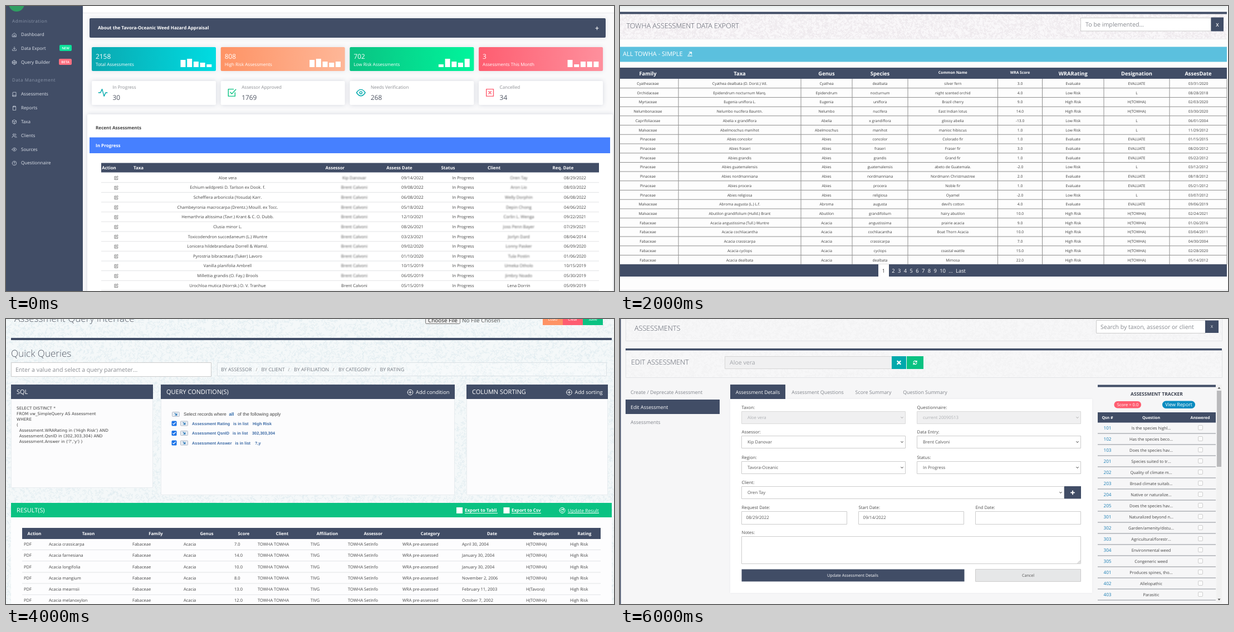
Recreate the animation shown at these times as an HTML page with a canvas. Size 1092 by 513 pixels, loop 8 s.

```html
<!DOCTYPE html>
<html lang="en">
<head>
<meta charset="utf-8">
<title>Assessment tour</title>
<style>
html, body { margin: 0; width: 100%; height: 100%; overflow: hidden; background: #fff; }
canvas { display: block; }
</style>
</head>
<body>
<canvas id="stage" width="1092" height="513"></canvas>
<script>
const g = document.getElementById('stage').getContext('2d');
const NAVY = '#414d66', GREEN = '#0ac282', RED = '#fe5d70', ORANGE = '#fe9365', TEAL = '#01a9ac', INK = '#444';
const SANS = '"Open Sans", sans-serif', ARIAL = '"Liberation Sans", Arial, sans-serif', WIDE = '"DejaVu Sans", Verdana, sans-serif';
const ORG = 'TOWHA', REGION = 'Tavora-Oceanic', LEAD = 'Brent Calvoni';

// y is the middle of the capitals
function text(s, x, y, size, color = INK, { w = 400, al = 'left', font = SANS, sp = 0 } = {}) {
  g.font = `${w} ${size}px ${font}`;
  g.textAlign = al;
  g.letterSpacing = sp + 'px';
  g.fillStyle = color;
  g.fillText(s, x, y + size * 0.36);
}
const mid = (s, x, y, size, color, w = 400) => text(s, x, y, size, color, { w, al: 'center' });
const title = (s, x, y, size) => text(s, x, y, size, '#555a66', { w: 300 });

function box(x, y, x2, y2, fill, stroke, r = 0) {
  g.beginPath();
  const o = stroke ? 0.5 : 0;
  g.roundRect(x + o, y + o, x2 - x - 2 * o, y2 - y - 2 * o, r);
  if (fill) { g.fillStyle = fill; g.fill(); }
  if (stroke) { g.strokeStyle = stroke; g.lineWidth = 1; g.stroke(); }
}
const rule = (x, x2, y, color) => box(x, y - 0.5, x2, y + 0.5, color);

function glow(x, y, x2, y2, fill, r, blur = 9, alpha = 0.13) {
  g.save();
  g.shadowColor = `rgba(60,75,110,${alpha})`;
  g.shadowBlur = blur;
  box(x, y, x2, y2, fill, null, r);
  g.restore();
}

// SVG path drawn on a 24-unit grid centred on x, y
function icon(d, x, y, size, color, width = 2) {
  g.save();
  g.translate(x - size / 2, y - size / 2);
  g.scale(size / 24, size / 24);
  g.strokeStyle = color;
  g.lineWidth = width;
  g.lineCap = g.lineJoin = 'round';
  g.stroke(new Path2D(d));
  g.restore();
}

const ICON = {
  home: 'M3 10L12 3l9 7v11H3zM9 21v-8h6v8',
  down: 'M3 15v6h18v-6M12 3v12M7 10l5 5 5-5',
  cube: 'M12 2l10 6v8l-10 6L2 16V8zM2 8l10 7 10-7M2 16l10-7 10 7M12 2v7M12 15v7',
  book: 'M4 20V4q0-2 2-2h14v20H6q-2 0-2-2zq0-3 2-3h14',
  clip: 'M8 4H5v18h14V4h-3M8 2h8v4H8z',
  pack: 'M12 2l9 5v10l-9 5-9-5V7zM3 7l9 5 9-5M12 12v10',
  users: 'M1 21q0-7 8-7t8 7M5 7a4 4 0 1 0 8 0a4 4 0 1 0-8 0M16 3q4 1 4 4t-4 4M19 15q4 1 4 6',
  eye: 'M1 12q5-8 11-8t11 8q-5 8-11 8T1 12zM9 12a3 3 0 1 0 6 0a3 3 0 1 0-6 0',
  help: 'M2 12a10 10 0 1 0 20 0a10 10 0 1 0-20 0M9 9q1-3 3-3t3 3q0 2-3 4M12 17v.1',
  pulse: 'M1 12h5l4-9 5 18 4-9h4',
  check: 'M8 11l4 4L22 4M20 12v9H3V3h13',
  cross: 'M3 3h18v18H3zM9 9l6 6M15 9l-6 6',
  edit: 'M11 4H3v17h17v-8M19 2l3 3-10 10H9v-3z',
  plus: 'M2 12a10 10 0 1 0 20 0a10 10 0 1 0-20 0M12 7v10M7 12h10',
  redo: 'M2 12a10 10 0 1 0 20 0a10 10 0 1 0-20 0M16 9a5 5 0 1 0 1 4M17 6v4h-4',
  cycle: 'M4 10a8 8 0 0 1 15-2M20 3v6h-6M20 14a8 8 0 0 1-15 2M4 21v-6h6',
  tick: 'M4 13l5 5L20 6',
  arrow: 'M6 6l12 12M18 8v10H8',
  chevron: 'M5 8l7 8 7-8',
  share: 'M2 21h20M5 15L19 4M9 3h11v10'
};

// Mottled paper made of short random curls
function paper(x, y, x2, y2, base, curl, n, seed) {
  const rnd = () => (seed = (seed * 16807) % 2147483647) / 2147483647;
  g.save();
  g.beginPath();
  g.rect(x, y, x2 - x, y2 - y);
  g.clip();
  g.fillStyle = base;
  g.fillRect(x, y, x2 - x, y2 - y);
  g.strokeStyle = curl;
  g.lineWidth = 1;
  g.beginPath();
  for (let i = 0; i < n; i++) {
    const a = x + rnd() * (x2 - x), b = y + rnd() * (y2 - y), t = rnd() * 6.3;
    g.moveTo(a + 2 * Math.cos(t), b + 2 * Math.sin(t));
    g.arc(a, b, 2, t, t + 2.5);
  }
  g.stroke();
  g.restore();
}

function blurred(s, x, y) {
  g.save();
  g.filter = 'blur(1.3px)';
  mid(s, x, y, 7.6, '#555');
  g.restore();
}

function sidebar() {
  box(0, 0, 138, 513, NAVY);
  g.fillStyle = '#2f9e62';
  g.beginPath();
  g.arc(19, -4, 14, 0, 7);
  g.fill();
  text('Administration', 11, 27, 8, '#8b96aa', { sp: 0.6 });
  text('Data Management', 11, 133.5, 8, '#8b96aa', { sp: 0.6 });
  const item = ([name, pic], y) => {
    icon(ICON[pic], 15, y + 0.5, 9, '#d5dbe6', 2);
    text(name, 27, y, 8.1, '#dfe4ec');
  };
  [['Dashboard', 'home'], ['Data Export', 'down'], ['Query Builder', 'cube']].forEach((m, i) => item(m, 51.5 + i * 24.8));
  [['Assessments', 'book'], ['Reports', 'clip'], ['Taxa', 'pack'], ['Clients', 'users'], ['Sources', 'eye'], ['Questionnaire', 'help']]
    .forEach((m, i) => item(m, 158.5 + i * 24.8));
  box(96, 70, 118, 81, '#0be19a', null, 2);
  mid('NEW', 107, 75.5, 6, '#fff', 600);
  box(95, 95, 118, 106, '#ff6f80', null, 2);
  mid('BETA', 106.5, 100.5, 6, '#fff', 600);
}

function dashboard() {
  box(0, 0, 1092, 513, '#fafafb');
  box(138, 0, 1092, 12, '#fff');
  rule(138, 1092, 12.5, '#e6e7ea');
  sidebar();
  glow(150, 22, 1077, 57, NAVY, 2);
  text(`About the ${REGION} Weed Hazard Appraisal`, 165, 39.5, 8.1, '#fff', { w: 700 });
  icon('M12 3v18M3 12h18', 1061.5, 40, 7, '#fff', 3.5);

  [['2158', 'Total Assessments', '#0aa8b0', '#00dce2', [13, 15, 10, 8, 5]],
   ['808', 'High Risk Assessments', ORANGE, '#feb798', [13, 15, 10, 8, 10]],
   ['702', 'Low Risk Assessments', GREEN, '#00f59c', [5, 15, 10, 8, 15]],
   ['3', 'Assessments This Month', RED, '#fe909d', [13, 5, 10, 10, 10]]
  ].forEach(([n, label, c1, c2, bars], i) => {
    const x = 154 + i * 231.7, fill = g.createLinearGradient(x, 0, x + 223, 0);
    fill.addColorStop(0, c1);
    fill.addColorStop(1, c2);
    glow(x, 74, x + 223, 117, fill, 2);
    text(n, x + 7, 90.5, 11.9, '#fff');
    text(label, x + 7, 105, 8.05, '#fff');
    bars.forEach((h, k) => box(x + 159.5 + k * 11.7, 110 - h, x + 168.5 + k * 11.7, 110, '#fff'));
  });
  [['In Progress', '30', 'pulse', TEAL], ['Assessor Approved', '1769', 'check', GREEN],
   ['Needs Verification', '268', 'eye', TEAL], ['Cancelled', '34', 'cross', RED]
  ].forEach(([label, n, pic, c], i) => {
    const x = 154 + i * 231.7;
    glow(x, 135, x + 223, 178, '#fff', 2, 8, 0.2);
    icon(ICON[pic], x + 20, 156, 17, c, 2);
    text(label, x + 37.5, 146.5, 8.1, '#8b8d92');
    text(n, x + 37.5, 164.5, 11.9, '#4c5260');
  });

  glow(146, 195, 1090, 530, '#fff', 2, 8, 0.2);
  text('Recent Assessments', 161, 219, 8.1, INK, { w: 700 });
  box(150, 236.5, 1085, 265, '#4680ff');
  text('In Progress', 161, 251, 8.1, '#fff', { w: 700 });
  box(171, 282.5, 1065, 299.5, NAVY);
  [['Action', 185], ['Taxa', 238], ['Assessor', 591], ['Assess Date', 706.5], ['Status', 794], ['Client', 876.5], ['Req. Date', 1000.5]]
    .forEach(([s, x]) => mid(s, x, 291, 7.9, '#fff', 700));
  `Aloe vera|09/14/2022|08/29/2022|Oren Tay
Echium wildpretii D. Tarlson ex Dook. f.|09/08/2022|08/03/2022|Aron Lio
Schefflera arboricola (Yosuda) Karr.|06/08/2022|06/08/2022|Welly Dorphin
Chambeyronia macrocarpa (Drentz.) Mouill. ex Tocc.|05/18/2022|04/06/2022|Depin Chong
Hemarthria altissima (Tavr.) Krant & C. O. Dubb.|12/10/2021|09/22/2021|Corlin L. Wenga
Clusia minor L.|08/26/2021|07/29/2021|Joss Penn Bayer
Toxicodendron succedaneum (L.) Wuntre|03/23/2021|08/04/2014|Jorlyn Dard
Lonicera hildebrandiana Dorrell & Wamsl.|09/02/2020|06/09/2020|Lonny Pasker
Pyrostria bibracteata (Tuker) Lavoro|01/10/2020|01/06/2020|Tula Postin
Vanilla planifolia Ambrell|10/15/2019|10/15/2019|Umeka Otholo
Millettia grandis (O. Fay.) Brools|06/05/2019|05/30/2019|Jimbry Noado
Urochloa mutica (Norrsk.) D. V. Tranhue|05/15/2019|05/09/2019|Lena Dorrin`.split('\n').forEach((row, i) => {
    const [taxon, date, req, client] = row.split('|'), y = 309 + i * 17.64;
    const person = i == 11 ? mid : blurred;
    rule(171, 1065, y + 8.8, '#e2e3e5');
    icon(ICON.edit, 198, y + 0.5, 8, '#444', 2);
    mid(taxon, 398, y, 7.5);
    person(i ? LEAD : 'Kip Danovar', 625.5, y, 7.5);
    mid(date, 730, y, 7.5);
    mid('In Progress', 821, y, 7.5);
    person(client, 921, y, 7.5);
    mid(req, 1022, y, 7.5);
  });
}

function dataExport() {
  box(0, 0, 1092, 513, '#fdfdfd');
  const right = 1090, top = g.createLinearGradient(0, 0, 0, 10);
  top.addColorStop(0, '#e9eeee');
  top.addColorStop(1, '#fafcfc');
  box(0, 0, right, 10, top);
  paper(0, 14, right, 59, '#f9f7f9', '#eee9ed', 5200, 17);
  box(0, 10.5, right, 14.5, NAVY);
  rule(0, right, 59.5, '#ececee');
  title(ORG + ' ASSESSMENT DATA EXPORT', 11.5, 35, 12.6);
  box(827, 21, 1062, 45.5, '#fff', '#ccc');
  text('To be implemented...', 836, 33.5, 10.7, '#85888e');
  box(1061.5, 20.5, 1084, 45.5, NAVY);
  mid('X', 1073, 33.5, 8.5, '#fff', 600);
  box(0, 73.5, right, 100.5, '#5bc0de');
  text(`ALL ${ORG} - SIMPLE`, 5, 86.5, 11, '#fff');
  icon(ICON.share, 125.5, 86.5, 9, '#fff', 3.2);

  const edges = [0, 105, 325, 417, 517, 678.5, 758.5, 869, 987, 1090], step = 16.71;
  const centre = k => (edges[k] + edges[k + 1]) / 2 - (k ? 0 : 2.5);
  box(0, 111, right, 131, NAVY);
  'Family|Taxa|Genus|Species|Common Name|WRA Score|WRARating|Designation|AssesDate'.split('|')
    .forEach((s, k) => mid(s, centre(k), k == 4 || k == 5 ? 119.5 : 121.5, k == 4 || k == 5 ? 6.7 : 9.4, '#fff', 700));
  // family | taxon | common name | score | rating | date
  `Cyatheaceae|Cyathea dealbata (D. Dorst.) Vd.|silver fern|3|E|03/31/2020
Orchidaceae|Epidendrum nocturnum Marq.|night scented orchid|4|L|08/28/2018
Myrtaceae|Eugenia uniflora L.|Brazil cherry|9|H|02/03/2020
Nelumbonaceae|Nelumbo nucifera Bauntn.|East Indian lotus|14|H|03/30/2020
Caprifoliaceae|Abelia x grandiflora|glossy abelia|-13|L|06/01/2004
Malvaceae|Abelmoschus manihot|manioc hibiscus|1|L|11/29/2012
Pinaceae|Abies concolor|Colorado fir|1|E|01/15/2015
Pinaceae|Abies fraseri|Fraser fir|3|E|08/20/2012
Pinaceae|Abies grandis|Grand fir|1|E|05/22/2012
Pinaceae|Abies guatemalensis|abeto de Guatemala.|-2|L|03/12/2012
Pinaceae|Abies nordmanniana|Nordmann Christmastree|2|E|08/18/2012
Pinaceae|Abies procera|Noble fir|1|E|05/21/2012
Pinaceae|Abies religiosa|Oyamel|-2|L|03/07/2012
Malvaceae|Abroma augusta (L.) L.f.|devil's cotton|4|E|09/06/2019
Malvaceae|Abutilon grandifolium (Hulld.) Brant|hairy abutilon|10|H|02/24/2021
Fabaceae|Acacia angustissima (Tull.) Wuntre|prairie acacia|9|H|01/26/2016
Fabaceae|Acacia cochliacantha|Boat Thorn Acacia|10|H|03/04/2011
Fabaceae|Acacia crassicarpa||7|H|04/30/2004
Fabaceae|Acacia cyclops|coastal wattle|15|H|02/28/2020
Fabaceae|Acacia dealbata|Mimosa|22|H|05/14/2012`.split('\n').forEach((row, i) => {
    const [family, taxon, common, score, r, date] = row.split('|');
    const [genus, a, b] = taxon.split(' '), y = 139.6 + i * step;
    const rating = { E: 'Evaluate', L: 'Low Risk', H: 'High Risk' }[r];
    const mark = { E: 'EVALUATE', L: 'L', H: `H(${ORG})` }[r];
    [family, taxon, genus, a == 'x' ? 'x ' + b : a, common, score + '.0', rating, mark, date]
      .forEach((s, k) => mid(s, centre(k), y, 6.7, '#3c3c3c'));
    rule(0, right, 131 + (i + 1) * step, '#8f8f8f');
  });
  edges.slice(1).forEach(x => box(x - 0.5, 131, x + 0.5, 465, '#8f8f8f'));
  box(0, 465, right, 487, NAVY);
  box(464, 465, 483, 487, '#fff');
  mid('1', 473.5, 476.5, 9.4, INK);
  for (let i = 2; i < 10; i++) mid(i, 491 + (i - 2) * 10.75, 476.5, 9.4, '#fff');
  mid('10', 579.5, 476.5, 9.4, '#fff');
  mid('...', 594, 476.5, 9.4, '#fff');
  mid('Last', 612, 476.5, 9.4, '#fff');
  rule(0, 1092, 511.5, '#dfe1e3');
}

function panel(x, x2, bottom, name, action) {
  box(x, 118, x2, bottom, '#fcfcfd', '#e8ecef');
  box(x, 118, x2, 144, NAVY);
  text(name, x + 10, 131, 11, '#fff');
  if (!action) return;
  text(action, x2 - 9.5, 132, 9.3, '#fff', { al: 'right' });
  icon(ICON.plus, action == 'Add condition' ? 726 : 1011.5, 132, 11.5, '#fff', 2);
}

function queries() {
  paper(0, 0, 1092, 513, '#f4f8f9', '#e3eef2', 30000, 91);
  title('Assessment Query Interface', 15, -1, 17.1);
  box(753, -9, 816, 9, '#efefef', '#777', 2);
  text('Choose File', 758, 2.5, 9.9, '#222');
  text('No File Chosen', 819, 2.5, 9.9, '#555');
  [['Load', ORANGE], ['Clear', RED], ['Save', GREEN]].forEach(([s, c], i) => {
    box(964 + i * 36, -12, 1000 + i * 36, 11, c);
    mid(s, 982 + i * 36, 0.5, 7.2, '#fff');
  });
  box(9, 34, 1088, 38, NAVY);
  title('Quick Queries', 9, 62, 17.1);
  box(9, 78, 369, 104, '#fff', '#ccc');
  text('Enter a value and select a query parameter...', 17, 91.5, 10.55, '#888b90');
  box(379, 78, 1079, 103, 'rgba(255,255,255,.25)', '#dbe1e5');
  [['ASSESSOR', 386], ['CLIENT', 458.5], ['AFFILIATION', 517], ['CATEGORY', 597], ['RATING', 671.5]]
    .forEach(([s, x]) => text('BY ' + s, x, 90.5, 8.9, '#777c84'));
  [450, 508, 588, 663].forEach(x => mid('/', x, 90.5, 8.5, '#999'));

  panel(9, 264, 304, 'SQL');
  panel(278, 806, 317, 'QUERY CONDITION(S)', 'Add condition');
  panel(827, 1081, 317, 'COLUMN SORTING', 'Add sorting');
  ['SELECT DISTINCT *', 'FROM vw_SimpleQuery AS Assessment', 'WHERE', '(', "  Assessment.WRARating in ('High Risk') AND",
   '  Assessment.QsnID in (302,303,304) AND', "  Assessment.Answer in ('?','y') )"]
    .forEach((s, i) => text(s, 19, 160 + i * 10.1, 7.3, '#444', { font: WIDE }));

  const handle = (x, y) => {
    box(x, y - 4.5, x + 14, y + 4.5, '#e6ebf1', '#b4bcc8', 1);
    icon(ICON.arrow, x + 7, y, 7, '#2878b8', 4);
  };
  const arial = (s, x, y, size, c, w) => text(s, x, y, size, c, { font: ARIAL, w });
  handle(298, 171.5);
  arial('Select records where', 319, 171.5, 8.2, '#444', 400);
  arial('all', 400.5, 171.5, 8.2, '#2f69a8', 700);
  arial('of the following apply', 416, 171.5, 8.3, '#444', 400);
  [['Rating', 'High Risk', 408, 443], ['QsnID', '302,303,304', 407, 442], ['Answer', '?,y', 411.5, 447]].forEach(([f, v, x1, x2], i) => {
    const y = 188 + i * 17.5;
    box(297.5, y - 4.5, 306.5, y + 4.5, '#1a73e8', null, 1.5);
    icon(ICON.tick, 302, y, 7, '#fff', 4);
    handle(313, y);
    arial('Assessment ' + f, 334, y, 7.35, '#3d6ba6', 700);
    arial('is in list', x1, y, 7.4, '#3d6ba6', 700);
    arial(v, x2, y, 7.4, '#3d6ba6', 700);
  });

  box(9, 357, 1088, 513, '#fdfdfe');
  box(9, 331, 1088, 357, GREEN);
  text('RESULT(S)', 19, 344, 10.9, '#fff');
  const link = (s, x, x2, size, w) => {
    text(s, x, 344.5, size, '#fff', { w });
    rule(x, x2, 349.5, '#fff');
  };
  box(809, 339, 820, 350, '#fff');
  link('Export to Tabli', 824, 883, 8, 700);
  box(893.5, 339, 904.5, 350, '#fff');
  link('Export to Csv', 908, 961, 8, 700);
  icon(ICON.redo, 999, 344.5, 12, '#fff', 2);
  link('Update Result', 1009, 1065, 8.5, 400);

  box(29, 376, 1068, 396, NAVY);
  const heads = [51, 148, 269, 360.5, 427, 496, 577, 659.5, 762, 873, 970, 1039];
  const cols = [32, 77, 227, 319, 410, 452, 547, 614, 712, 819, 934, 1013];
  'Action|Taxon|Family|Genus|Score|Client|Affiliation|Assessor|Category|Date|Designation|Rating'.split('|')
    .forEach((s, k) => mid(s, heads[k], 386, 7.7, '#fff', 700));
  [['crassicarpa', 7, 'April 30, 2004'], ['farnesiana', 14, 'January 30, 2004'], ['longifolia', 10, 'January 30, 2004'],
   ['mangium', 8, 'November 2, 2006'], ['mearnsii', 13, 'February 11, 2003'], ['melanoxylon', 12, 'October 7, 2002']
  ].forEach(([sp, score, date], i) => {
    const y = 405.5 + i * 20.15;
    ['PDF', 'Acacia ' + sp, 'Fabaceae', 'Acacia', score + '.0', `${ORG} ${ORG}`, 'TIVG', ORG + ' SetInfo', 'WRA pre-assessed',
      date, `H(${i == 4 ? 'Tavora' : ORG})`, 'High Risk'].forEach((s, k) => text(s, cols[k], y, 7.55, INK));
    rule(29, 1068, y + 10.1, '#e1e3e6');
  });
}

function field(label, value, x, x2, y, { off = false, list = true, h = 23 } = {}) {
  text(label, x + 0.5, y - 6.5, 7.8, '#4a4a4a');
  box(x, y, x2, y + h, off ? '#f0f0f1' : '#fff', off ? '#dadada' : '#ccc');
  text(value, x + (list ? 11 : 8.5), y + 11.5, 7.75, off ? '#adafb3' : '#555');
  if (list) icon(ICON.chevron, x2 - 6.5, y + 11.5, 6, off ? '#aaa' : '#333', 4);
}

function editor() {
  box(0, 0, 1092, 513, '#f6f6f7');
  box(0, 0, 1.5, 513, NAVY);
  paper(10, 0, 1082, 39, '#f7f7f8', '#f3f3f4', 3500, 5);
  box(10, -5, 1082, 40, null, '#e2e3e6');
  title('ASSESSMENTS', 26, 16.5, 12.6);
  box(855, 2, 1052, 26, '#fff', '#ccc');
  text('Search by taxon, assessor or client', 863, 14.5, 10.5, '#85888e');
  box(1051, 2.5, 1075, 25, NAVY);
  mid('X', 1063, 13.5, 6.8, '#fff');
  paper(10, 57, 1082, 105, '#f7f7f8', '#f3f3f4', 4000, 8);
  box(10, 55, 1082, 106, null, '#e2e3e6');
  box(10, 53, 1081, 56.5, NAVY);
  title('EDIT ASSESSMENT', 20, 77, 12.5);
  box(188, 67, 489, 90, '#f0f0f1', '#d6d6d6');
  text('Aloe vera', 197, 78.5, 10.6, '#a2a5aa');
  box(488, 67, 514, 90, TEAL);
  icon('M5 5l14 14M19 5L5 19', 501, 78.5, 9, '#fff', 6);
  box(515, 67, 545, 90, GREEN);
  icon(ICON.cycle, 530, 78.5, 9, '#fff', 3);

  text('Create / Deprecate Assessment', 19, 131.5, 8.9, '#80848b');
  box(10, 145, 179, 171, NAVY);
  text('Edit Assessment', 19, 158.5, 8.9, '#fff');
  text('Assessments', 19, 186, 8.9, '#80848b');
  glow(198, 144, 848, 493, '#fff', 0, 4, 0.06);
  box(198, 118, 297, 144, NAVY);
  [['Assessment Details', 247.5], ['Assessment Questions', 355], ['Score Summary', 455], ['Question Summary', 548]]
    .forEach(([s, x], i) => mid(s, x, 131.5, 8.85, i ? '#80848b' : '#fff'));

  field('Taxon:', 'Aloe vera', 218, 513, 166, { off: true });
  field('Questionnaire:', 'current 20090513', 533, 828, 166, { off: true });
  field('Assessor:', 'Kip Danovar', 218, 513, 210);
  field('Data Entry:', LEAD, 533, 828, 210);
  field('Region:', REGION, 218, 513, 256);
  field('Status:', 'In Progress', 533, 828, 256);
  field('Client:', 'Oren Tay', 218, 798, 301);
  box(798, 301, 828, 323.5, NAVY);
  icon('M12 4v16M4 12h16', 813, 312.5, 9, '#fff', 5);
  const plain = { list: false, h: 24 };
  field('Request Date:', '08/29/2022', 218, 408, 346, plain);
  field('Start Date:', '09/14/2022', 428, 618, 346, plain);
  field('End Date:', '', 638, 828, 346, plain);
  field('Notes:', '', 218, 828, 391, { list: false, h: 50 });
  icon('M4 22L22 4M14 22l8-8', 824, 437, 6, '#777', 2.5);
  box(218.5, 450.5, 618.5, 472.5, NAVY);
  mid('Update Assessment Details', 418, 461.5, 7.25, '#fff');
  box(638, 450, 828, 473, '#e6e7e8', '#ccc');
  mid('Cancel', 733, 461.5, 7.2, '#555');

  box(858, 118.5, 1070, 122.5, NAVY);
  mid('ASSESSMENT TRACKER', 964, 134.5, 8.5, '#3c4250', 700);
  box(887.5, 148, 936, 160.5, RED, null, 6);
  mid('Score = 0.0', 912, 154.3, 7.6, '#fff');
  box(974, 147.5, 1033, 161, '#0a8cc0', null, 6.5);
  mid('View Report', 1003.5, 154.3, 8.7, '#fff');
  box(858, 168, 1070, 186.5, NAVY);
  [['Qsn #', 875.5], ['Question', 954], ['Answered', 1042]].forEach(([s, x]) => mid(s, x, 177.5, 7.05, '#fff', 700));
  ['Is the species highl...', 'Has the species beco...', 'Does the species hav...', 'Species suited to tr...', 'Quality of climate m...',
   'Broad climate suitab...', 'Native or naturalize...', 'Does the species hav...', 'Naturalized beyond n...', 'Garden/amenity/distu...',
   'Agricultural/forestr...', 'Environmental weed', 'Congeneric weed', 'Produces spines, tho...', 'Allelopathic', 'Parasitic'
  ].forEach((q, i) => {
    const y = 196 + i * 20, n = i < 3 ? 101 + i : i < 8 ? 198 + i : i < 13 ? 293 + i : 388 + i;
    mid(n, 875.5, y + 0.5, 8.2, '#1b7fb5');
    mid(q, 954, y, 7.4, '#444');
    box(1038, y - 5, 1047, y + 4, '#fbfbfb', '#cfcfcf', 1.5);
    rule(858, 1070, y + 10, '#8b8f96');
  });
  box(1071, 118, 1081, 511, '#f1f1f1');
  box(1072, 129, 1080, 266, '#b9b9bb');
  const tri = (y, d) => {
    g.fillStyle = '#555';
    g.beginPath();
    g.moveTo(1073.5, y);
    g.lineTo(1078.5, y);
    g.lineTo(1076, y + d);
    g.fill();
  };
  tri(125.5, -3);
  tri(503.5, 3);
}

const scenes = [dashboard, dataExport, queries, editor];
const start = performance.now();
let shown = -1;
g.textRendering = 'geometricPrecision';

function tick(now) {
  const i = Math.floor(Math.max(0, now - start) / 2000) % scenes.length;
  if (i !== shown) scenes[shown = i]();
  requestAnimationFrame(tick);
}
tick(start);
</script>
</body>
</html>
```
